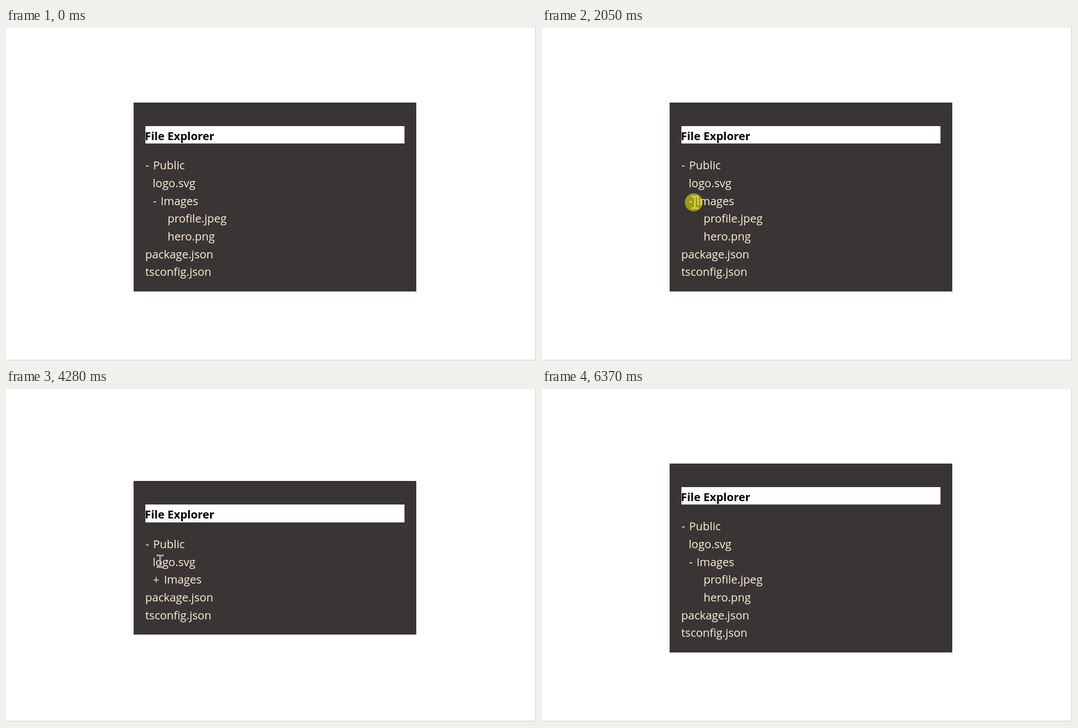
Write an HTML page that moves like this. It is 943 px wide and 594 px high and loops after 7.31 s.

```html
<!DOCTYPE html>
<html lang="en">
<head>
<meta charset="utf-8">
<title>File Explorer</title>
<style>
  html, body { margin: 0; width: 100%; height: 100%; overflow: hidden; background: #fff; }
  svg { display: block; }
  text { font: 20px "Open Sans", "Noto Sans", sans-serif; fill: #fff0d6; }
  #title { font-weight: 700; fill: #000; }
</style>
</head>
<body>
<svg width="943" height="594">
  <path d="M942 0h1v593h-943v-1h942z" fill="#c6c6c6"/>
  <rect id="panel" x="227" width="503" fill="#3a3535"/>
  <rect id="bar" x="248" width="461" fill="#fff"/>
  <text id="title" x="247">File Explorer</text>
  <g id="list"></g>
  <path id="arrow" d="M0 0V19L4.5 15 8 22.5 11 21 8 14H14Z" fill="#fff" stroke="#222" stroke-width=".6"/>
  <g id="beam" fill="none">
    <path id="stem" d="M-6-10.5H-2L0-9 2-10.5H6M0-9V9M-6 10.5H-2L0 9 2 10.5H6" stroke="#e8e8e8" stroke-width="2.6"/>
    <path d="M-5-10.5H-2L0-9 2-10.5H5M0-9V9M-5 10.5H-2L0 9 2 10.5H5" stroke="#3a3535" stroke-width=".8"/>
  </g>
  <circle id="click" r="16" fill="#ff0" fill-opacity=".5"/>
</svg>
<script>
const LOOP = 7310, STEP = 58, LINE = 31.67, MIDDLE = 301.4, LEFT = 247.8, INDENT = 13.2;
const $ = id => document.getElementById(id);
const set = (el, attrs) => { for (const k in attrs) el.setAttribute(k, attrs[k]); };
const show = (el, on) => { el.style.display = on ? "" : "none"; };
const within = (t, a, b) => t >= a && t < b;

const tree = {
  Public: { "logo.svg": null, Images: { "profile.jpeg": null, "hero.png": null } },
  "package.json": null,
  "tsconfig.json": null
};

function addText(text) {
  const el = document.createElementNS("http://www.w3.org/2000/svg", "text");
  el.textContent = text;
  return $("list").appendChild(el);
}

// Each level is indented one unit more than the one before it.
function flatten(folder, parents = []) {
  const depth = parents.length;
  const x = LEFT + INDENT * depth * (depth + 1) / 2;
  return Object.entries(folder).flatMap(([name, inner]) => [
    { name, x, parents, sign: inner && addText("-"), label: addText(name) },
    ...(inner ? flatten(inner, [...parents, name]) : [])
  ]);
}
const rows = flatten(tree);

const smooth = u => u * u * (3 - 2 * u);
const easeIn = u => u * u;
const easeOut = u => 1 - easeIn(1 - u);

// The pointer travels from stop to stop; bow bends the way sideways.
const stops = [
  { x: 906, y: 633 },
  { start: 60, end: 740, x: 290, y: 246, bow: 25, ease: easeOut },
  { start: 810, end: 1250, x: 282, y: 341, bow: 16 },
  { start: 1430, end: 1870, x: 272, y: 311 },
  { start: 2480, end: 2770, x: 269.5, y: 331 },
  { start: 3260, end: 3720, x: 274.5, y: 308 },
  { start: 4280, end: 4960, x: 256.5, y: 271 },
  { start: 5080, end: 5080, x: 255, y: 274 },
  { start: 5460, end: 5920, x: 257.5, y: 303.5 },
  { start: 6250, end: 6370, x: 995, y: 666, ease: easeIn }
];

function pointer(t) {
  const i = stops.findLastIndex(s => t >= s.start);
  if (i < 0) return stops[0];
  const from = stops[i - 1], { start, end, x, y, bow = 0, ease = smooth } = stops[i];
  const held = (Math.floor((t - start) / STEP) + 1) * STEP;
  const u = t >= end ? 1 : ease(Math.min(1, held / (end - start + STEP)));
  const dx = x - from.x, dy = y - from.y;
  const bend = bow * Math.sin(Math.PI * u) / Math.hypot(dx, dy);
  return { x: from.x + dx * u - dy * bend, y: from.y + dy * u + dx * bend };
}

function draw(t) {
  const open = {
    Public: !within(t, 5130, 6090),
    Images: !within(t, 2160, 3050) && !within(t, 4000, 6090)
  };
  const shown = row => row.parents.every(name => open[name]);
  const height = 115.5 + LINE * rows.filter(shown).length;
  const top = MIDDLE - height / 2;
  const span = (el, y, h) => set(el, { y: Math.round(y), height: Math.round(y + h) - Math.round(y) });
  span($("panel"), top, height);
  span($("bar"), top + 42, LINE);
  set($("title"), { y: Math.round(top + 66.8) });

  const p = pointer(t);
  let baseline = top + 119.4, overText = false;
  for (const row of rows) {
    const { sign, label } = row, on = shown(row);
    show(label, on);
    if (sign) show(sign, on);
    if (!on) continue;
    const y = Math.round(baseline);
    let x = row.x;
    if (sign) {
      sign.textContent = open[row.name] ? "-" : "+";
      set(sign, { x: x + 0.5, y });
      x += open[row.name] ? 14 : 20;
    }
    set(label, { x, y });
    const right = x + label.getComputedTextLength();
    overText ||= p.x >= row.x && p.x <= right && within(p.y, baseline - 22.8, baseline + 5.2);
    baseline += LINE;
  }

  const pressed = within(t, 5080, 5130);
  const beam = overText && !pressed;
  show($("beam"), beam);
  show($("arrow"), !beam);
  for (const id of ["beam", "arrow"]) set($(id), { transform: `translate(${p.x} ${p.y})` });
  show($("click"), within(t, 2050, 2160) || within(t, 3000, 3050));
  set($("click"), { cx: p.x - 2, cy: p.y });
}

const begin = performance.now();
function tick() {
  draw((performance.now() - begin) % LOOP);
  requestAnimationFrame(tick);
}
tick();
</script>
</body>
</html>
```
